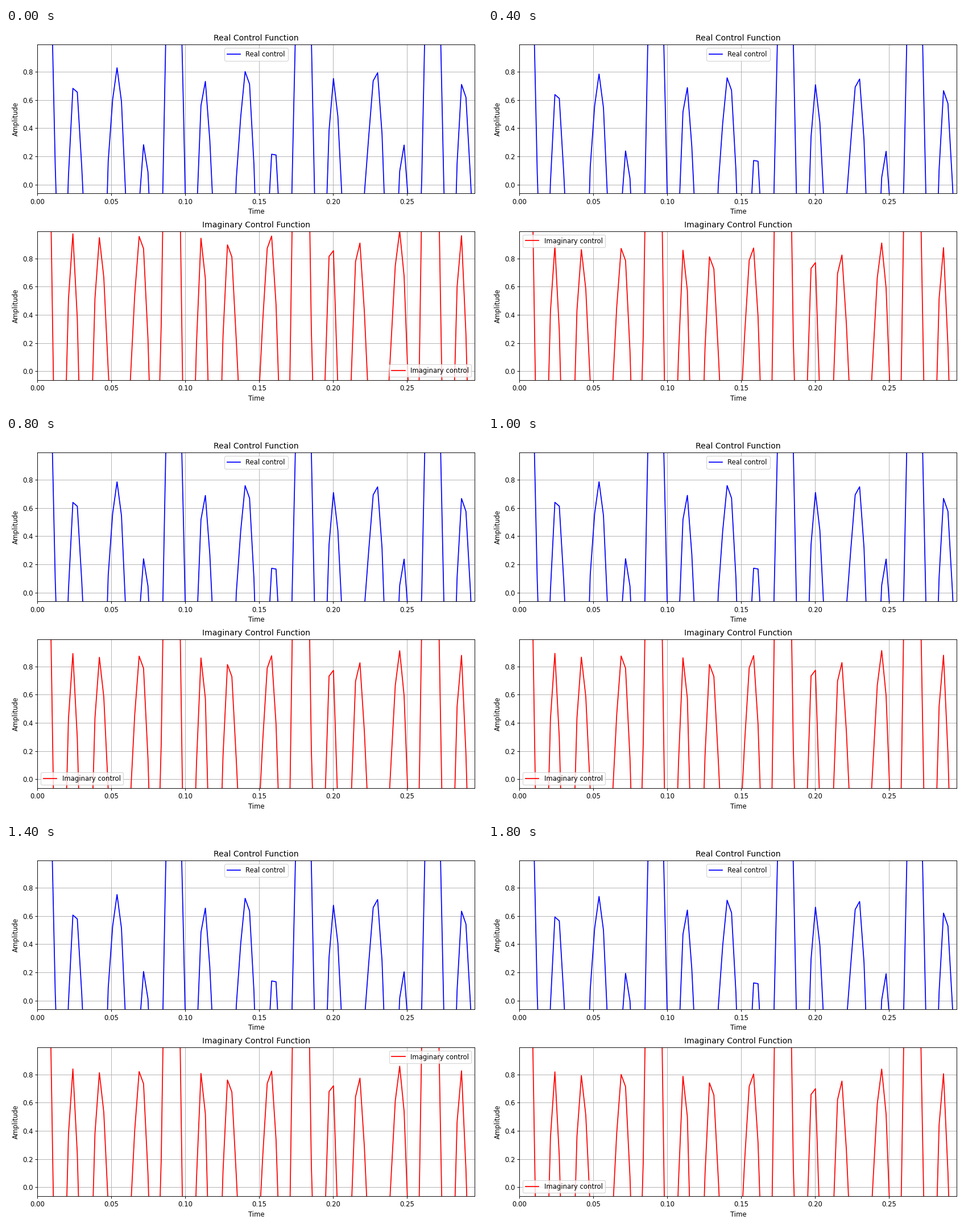
Recreate the animation shown at these times as a matplotlib script. Size 837 by 669 pixels, loop 2 s.

```python
import numpy as np
import matplotlib.pyplot as plt
from matplotlib.animation import FuncAnimation

W, H, DPI = 837, 669, 83.7
STEPS = 10
SPAN = 0.296        # length of the time axis
PERIOD = 29.3       # samples per repeat of the signal
FLOOR = -0.9        # level between lobes, below the view
N = np.arange(100)
TIME = np.linspace(0, SPAN, len(N))

# Key points of one period: centre, height and curvature of each lobe
REAL_LOBES = [(1.55, 2.57, 0.585), (8.45, 0.753, 0.36),
              (18.03, 0.828, 0.266), (24.19, 0.2955, 0.352)]
IMAG_LOBES = [(1.05, 3.60, 0.83), (7.94, 0.976, 0.603),
              (14.07, 0.949, 0.398), (23.36, 0.994, 0.32)]

# Steps at which the signal jumps down, and at which the legend moves
JUMPS = {1: 0.0454, 6: 0.035, 9: 0.0148}
CORNERS = {0: "lower right", 1: "upper left", 3: "lower left",
           6: "upper right", 9: "lower left"}


def signal(lobes, drop):
    """Periodic row of lobes, each steeper towards its nearer neighbour."""
    centres = np.array([lobe[0] for lobe in lobes])
    gap_left = (centres - np.roll(centres, 1)) % PERIOD
    skews = 0.022 * (gap_left - np.roll(gap_left, -1))
    y = np.full(len(N), FLOOR)
    for (centre, height, bend), skew in zip(lobes, skews):
        u = (N - centre + PERIOD / 2) % PERIOD - PERIOD / 2
        d = np.abs(u)
        lobe = height - drop - bend * d ** 2 * (1 - 0.12 * d + skew * u)
        y = np.maximum(y, np.where(d < 3, lobe, FLOOR))
    return y


def real_drop(i):
    """Hard jumps down with a slow creep back up between them."""
    jumps = sum(size for start, size in JUMPS.items() if i >= start)
    return jumps - 0.0006 * i


def imag_drop(i):
    return 1.24 * real_drop(i) ** 0.86


def corner(i):
    return CORNERS[max(start for start in CORNERS if start <= i)]


def panel(bottom, title, label, color):
    """Axes whose lower edge lies `bottom` pixels below the top of the stage."""
    left, width, height = 55.49, 768.8, 262
    ax = fig.add_axes([left / W, 1 - bottom / H, width / W, height / H])
    ax.set(xlim=(0, SPAN), ylim=(-0.063, 0.991), title=title,
           xlabel="Time", ylabel="Amplitude",
           xticks=np.arange(6) * 0.05, yticks=np.arange(5) * 0.2)
    ax.xaxis.set_major_formatter("{x:.2f}")
    ax.yaxis.set_major_formatter("{x:.1f}")
    ax.grid(True)
    line, = ax.plot([], [], color=color, label=label)
    return ax, line


# The tiny margin keeps rounding from losing a pixel
fig = plt.figure(figsize=((W + 1e-6) / DPI, (H + 1e-6) / DPI), dpi=DPI,
                 facecolor="white")
real_ax, real_line = panel(291.45, "Real Control Function",
                           "Real control", "blue")
imag_ax, imag_line = panel(620.05, "Imaginary Control Function",
                           "Imaginary control", "red")
real_ax.legend(loc="upper center")


def update(i):
    real_line.set_data(TIME, signal(REAL_LOBES, real_drop(i)))
    imag_line.set_data(TIME, signal(IMAG_LOBES, imag_drop(i)))
    imag_ax.legend(loc=corner(i))
    return real_line, imag_line


anim = FuncAnimation(fig, update, frames=STEPS, interval=200,
                     repeat=True, blit=False)
plt.show()
```
